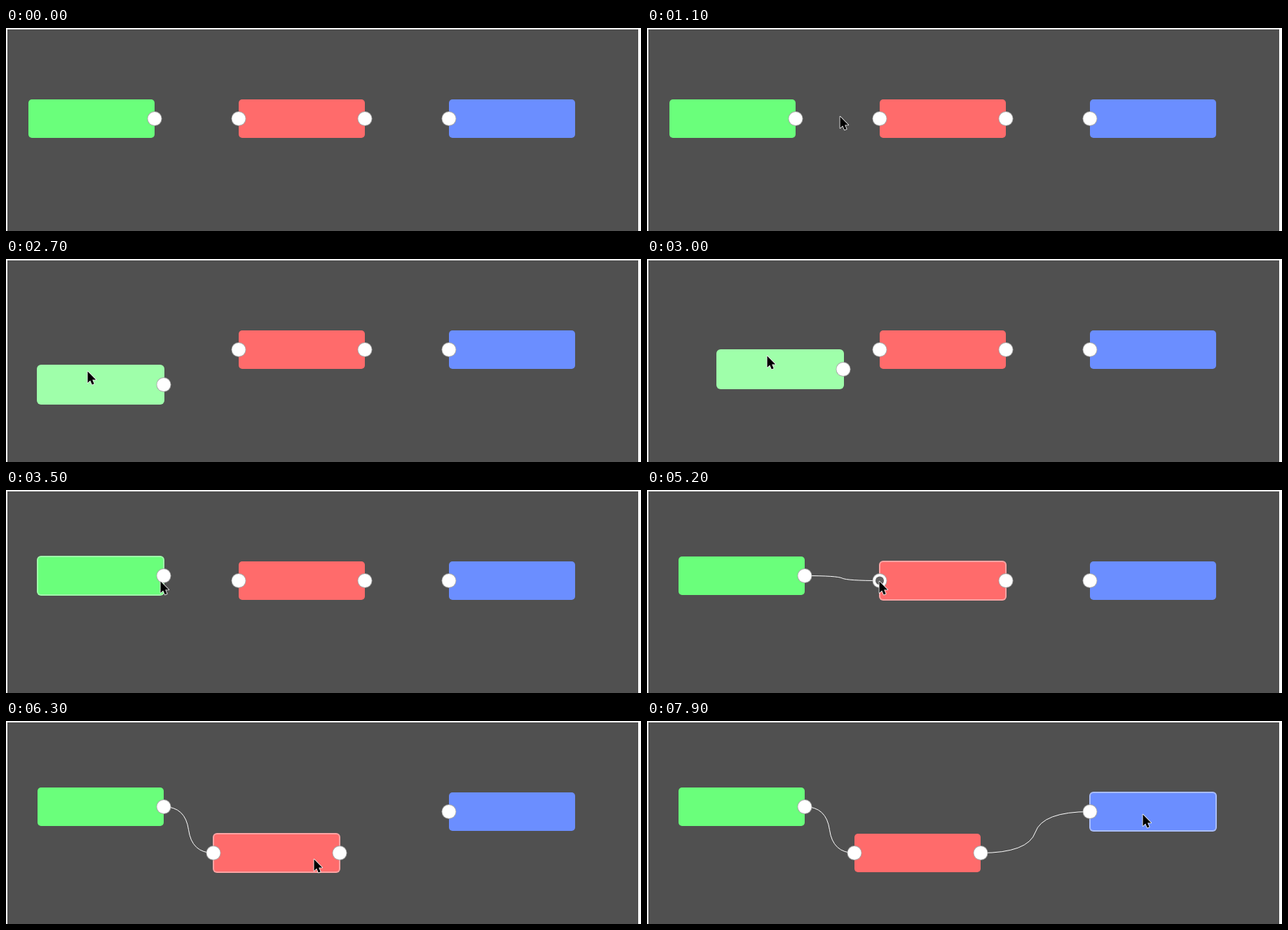
Animation, 906 px wide and 290 px high, one loop 8000 ms. Source, as an HTML page with a canvas:

```html
<!DOCTYPE html>
<html lang="en">
<head>
<meta charset="utf-8">
<title>Node editor</title>
<style>
  html, body { margin: 0; width: 100%; height: 100%; overflow: hidden; background: #fff; }
  canvas { display: block; }
</style>
</head>
<body>
<canvas id="stage" width="906" height="290"></canvas>
<script>
const ctx = document.getElementById('stage').getContext('2d');
const LOOP = 8000, STEP = 100;
const NODE_W = 180, NODE_H = 55;

// Pointer path: [step, x, y]
const path = [
  [3, 283, 261], [4, 225, 99], [5, 225, 99], [6, 200, 106], [8, 112, 130], [9, 122, 134],
  [10, 190, 132], [12, 360, 119], [14, 455, 125], [17, 680, 120], [19, 790, 119], [20, 797, 119],
  [23, 178, 97], [25, 103, 110], [26, 102, 138], [27, 116, 160], [28, 146, 161], [30, 171, 138],
  [32, 116, 103], [33, 130, 108], [35, 220, 130], [36, 232, 126], [37, 232, 126], [38, 231, 126],
  [39, 231, 126], [40, 230, 125], [41, 230, 125], [42, 230, 122], [43, 230, 122], [45, 245, 112],
  [49, 330, 129], [50, 330, 129], [51, 331, 130], [52, 331, 130], [55, 475, 138], [59, 459, 181],
  [61, 450, 213], [62, 439, 197], [63, 439, 197], [68, 481, 187], [73, 633, 130], [75, 633, 130],
  [79, 707, 133]
];

const green = { x: 32, y: 102, fill: '#6aff7b', light: '#9fffaa', ports: [1], drag: { from: 25, to: 32, dx: 71, dy: 8 } };
const red = { x: 332, y: 102, fill: '#ff6b6b', light: '#ffa3a3', ports: [0, 1], drag: { from: 55, to: 62, dx: 143, dy: 36 } };
const blue = { x: 632, y: 102, fill: '#6b8eff', light: '#a9bdff', ports: [0] };
const nodes = [green, red, blue];
const links = [
  { a: green, b: red, from: 44, snap: 49 },
  { a: red, b: blue, from: 69, snap: 76 }
];

function pointerAt(step) {
  let i = 0;
  while (i < path.length - 2 && path[i + 1][0] <= step) i++;
  const [s0, x0, y0] = path[i], [s1, x1, y1] = path[i + 1];
  const u = (step - s0) / (s1 - s0);
  return { x: Math.round(x0 + (x1 - x0) * u), y: Math.round(y0 + (y1 - y0) * u) };
}

function placeNode(node, step) {
  const d = node.drag;
  if (!d || step < d.from) return { x: node.x, y: node.y };
  const p = pointerAt(Math.min(step, d.to));
  return { x: p.x - d.dx, y: p.y - d.dy };
}

const portAt = (pos, side) => ({ x: pos.x + side * NODE_W, y: pos.y + NODE_H / 2 });

function roundRect(x, y, w, h, r, color) {
  ctx.beginPath();
  ctx.roundRect(x, y, w, h, r);
  ctx.fillStyle = color;
  ctx.fill();
}

function disc(p, r, color) {
  ctx.beginPath();
  ctx.arc(p.x, p.y, r, 0, Math.PI * 2);
  ctx.fillStyle = color;
  ctx.fill();
}

function drawNode(node, pos, step, pointer) {
  const { x, y } = pos, d = node.drag;
  const dragging = d && step > d.from && step <= d.to;
  const hover = pointer && pointer.x >= x - 1 && pointer.x <= x + NODE_W + 1 &&
    pointer.y >= y - 1 && pointer.y <= y + NODE_H + 1;
  if (dragging || hover) roundRect(x - 1, y - 1, NODE_W + 2, NODE_H + 2, 6, node.light);
  if (dragging) return;
  const inset = hover ? 1 : 0;
  roundRect(x + inset, y + inset, NODE_W - 2 * inset, NODE_H - 2 * inset, 5 - inset, node.fill);
}

function drawLink(a, b) {
  const mx = (a.x + b.x) / 2, my = (a.y + b.y) / 2;
  const reach = (mx - a.x) * 0.87;
  ctx.beginPath();
  ctx.moveTo(a.x, a.y);
  ctx.quadraticCurveTo(a.x + reach, a.y, mx, my);
  ctx.quadraticCurveTo(b.x - reach, b.y, b.x, b.y);
  ctx.strokeStyle = '#fff';
  ctx.lineWidth = 1;
  ctx.stroke();
}

function drawPort(p, pointer) {
  disc(p, 10.5, '#aaa');
  disc(p, 9.6, '#fff');
  if (pointer && Math.hypot(pointer.x - p.x, pointer.y - p.y) < 8.5) disc(p, 6, '#626262');
}

function drawPointer({ x, y }) {
  ctx.save();
  ctx.translate(x + 0.5, y + 0.5);
  ctx.beginPath();
  [[0, 0], [0, 16.5], [3.7, 13], [6.3, 19], [9.2, 17.8], [6.7, 12], [11.8, 12]]
    .forEach(([px, py]) => ctx.lineTo(px, py));
  ctx.closePath();
  ctx.lineJoin = 'round';
  ctx.lineWidth = 1.6;
  ctx.strokeStyle = '#fff';
  ctx.stroke();
  ctx.fillStyle = '#000';
  ctx.fill();
  ctx.restore();
}

function draw(time) {
  const step = Math.floor((time % LOOP) / STEP);
  const pointer = step >= path[0][0] ? pointerAt(step) : null;
  const places = new Map(nodes.map(n => [n, placeNode(n, step)]));

  ctx.fillStyle = '#fff';
  ctx.fillRect(0, 0, 906, 290);
  ctx.fillStyle = '#505050';
  ctx.fillRect(2, 2, 900, 288);

  nodes.forEach(n => drawNode(n, places.get(n), step, pointer));
  links.filter(l => step >= l.from).forEach(l => {
    const end = step >= l.snap ? portAt(places.get(l.b), 0) : pointer;
    drawLink(portAt(places.get(l.a), 1), end);
  });
  nodes.forEach(n => n.ports.forEach(side => drawPort(portAt(places.get(n), side), pointer)));
  if (pointer) drawPointer(pointer);
}

const start = performance.now();
function tick() {
  draw(performance.now() - start);
  requestAnimationFrame(tick);
}
tick();
</script>
</body>
</html>
```
